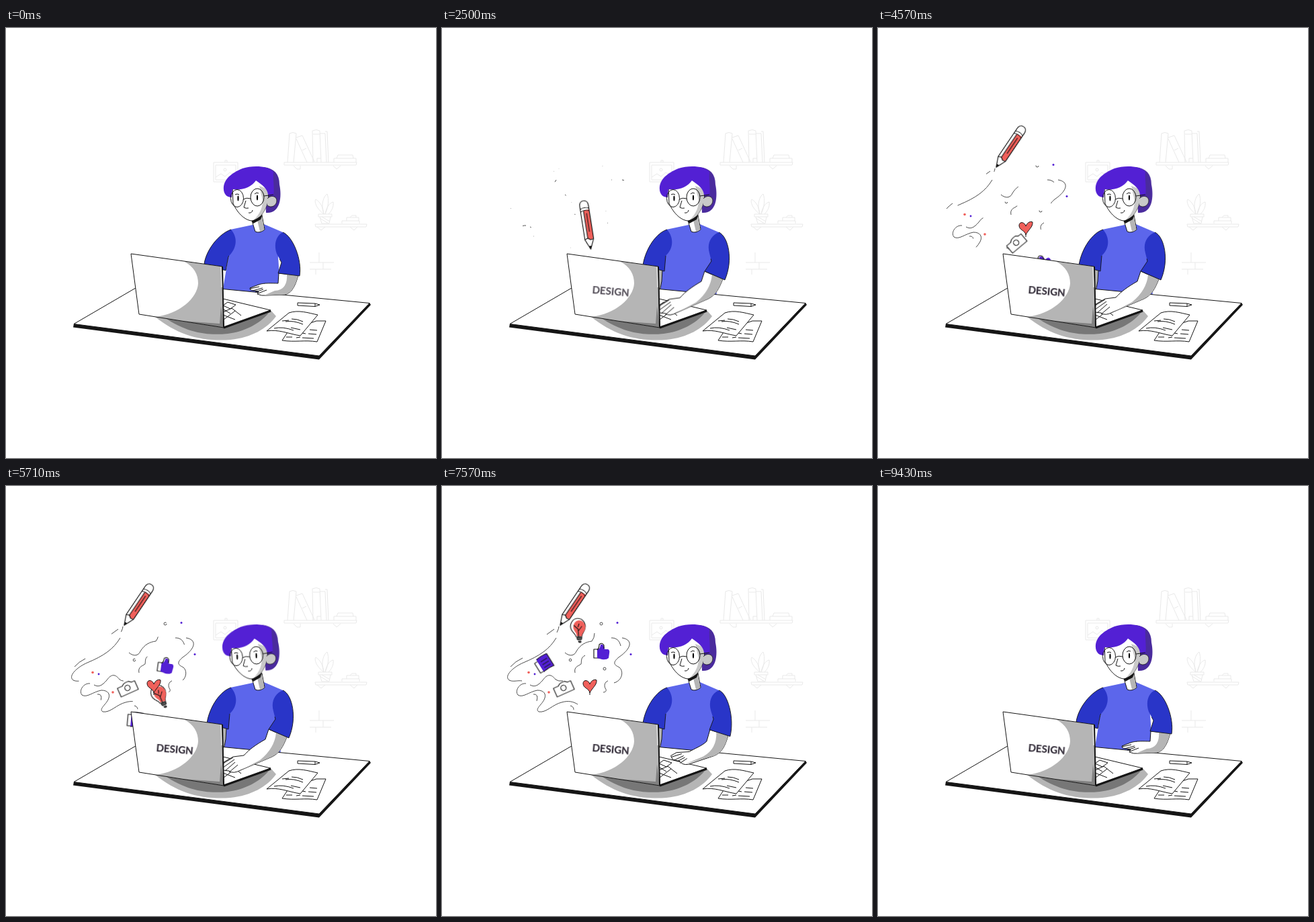
Write an HTML page that moves like this. It is 640 by 640 pixels and loops after 9.5 s.

```html
<!DOCTYPE html>
<html lang="en">
<head>
<meta charset="utf-8">
<title>Designer at a desk</title>
<style>
html, body { margin: 0; width: 100%; height: 100%; overflow: hidden; background: #fff; }
svg { display: block; width: 100vw; height: 100vh; }
svg * { animation: 9.5s linear infinite; }

.line { fill: none; stroke: #151515; stroke-width: 1; stroke-linejoin: round; }
.ink { fill: #fff; stroke: #151515; stroke-width: 1; stroke-linejoin: round; }
.faint { fill: none; stroke: #e9e9e9; stroke-width: 1; }
.grey { fill: #b5b5b5; }
.red { fill: #f0605b; }
.violet { fill: #5320d4; }
.label { font: 700 15px Lato, "Open Sans", sans-serif; text-anchor: middle; fill: #39333f; stroke: #39333f; stroke-width: .25; animation-name: label; }

@keyframes label { 0%, 3.5% { opacity: 0 } 11.3% { opacity: .34 } 26.3% { opacity: .82 } 34%, 100% { opacity: 1 } }

/* head and arms */
.head { transform-origin: 374px 295px; animation-name: sway; }
@keyframes sway {
  0%, 25%, 50%, 76%, 100% { transform: none; animation-timing-function: ease-in-out }
  12%, 37%, 62% { transform: rotate(-2deg); animation-timing-function: ease-in-out }
}
/* the dash leaves the seam between sleeve and shirt unstroked */
.sleeve { fill: #2935c8; stroke: #151515; stroke-width: .9; stroke-dasharray: 74 26; }
.leftSleeve { animation-name: leftSleeve; }
@keyframes leftSleeve {
  0%, 88%, 100% { d: path("M335 300C317 306 298 330 295 351L327 361L331 340C343 329 346 313 335 300Z") }
  12%, 23%, 72.6%, 80.8% { d: path("M335 300C319 305 303 328 299 353L331 362L333 339C344 329 346 313 335 300Z") }
}
.leftForearm { animation-name: leftForearm; }
@keyframes leftForearm { 0%, 88%, 100% { transform: translateX(-7px) } 11%, 80.8% { transform: none } }

.rightSleeve { animation-name: rightSleeve; }
@keyframes rightSleeve {
  0%, 88%, 100% { d: path("M412 304C427 310 441 345 437 369L405 365L410 349L403 336C398 322 402 309 412 304Z"); animation-timing-function: ease-in }
  11.3%, 80.8% { d: path("M412 304C425 308 436 345 431 372L400 363L405 347L401 335C397 321 401 309 412 304Z"); animation-timing-function: ease-out }
  23%, 72.6% { d: path("M412 304C426 310 434 345 421 375L391 362L401 347L398 335C394 321 400 309 412 304Z"); animation-timing-function: ease-in }
}
.forearm { animation-name: forearm; }
@keyframes forearm {
  0%, 88%, 100% { d: path("M406 365L405 380C396 380 384 379 376 382L363 387L364 390L376 392L374 396Q380 399 388 398L413 397C426 396 431 382 435 368Z"); animation-timing-function: ease-in }
  11.3%, 80.8% { d: path("M401 363L396 381C390 388 380 390 372 394L352 395L345 399L349 403L360 406Q363 412 371 412L408 401C420 396 424 386 428 371Z"); animation-timing-function: ease-out }
  23%, 72.6% { d: path("M391 362L386 377C372 385 362 392 354 401L338 403L324 411L323 423L332 424Q338 429 349 423L396 403C408 397 412 388 418 374Z"); animation-timing-function: ease-in }
}
.armShade { animation-name: armShade; }
@keyframes armShade {
  0%, 88%, 100% { d: path("M384 398L413 397C426 396 431 382 435 368L418 365Q420 390 400 391Z"); animation-timing-function: ease-in }
  11.3%, 80.8% { d: path("M366 411L408 401C420 396 424 386 428 371L410 366Q412 391 392 401Z"); animation-timing-function: ease-out }
  23%, 72.6% { d: path("M349 423L396 403C408 397 412 388 418 374L402 367Q400 390 378 408Z"); animation-timing-function: ease-in }
}
.fingers { animation-name: fingers; }
@keyframes fingers {
  0%, 88%, 100% { d: path("M363 388L377 385M367 391L382 387M371 393L383 389M375 395L388 390"); animation-timing-function: ease-in }
  11.3%, 80.8% { d: path("M346 401L362 397M352 405L365 400M357 406L367 402M360 409L370 403"); animation-timing-function: ease-out }
  23%, 72.6% { d: path("M323 413L338 404M323 419L340 407M326 424L341 411M332 426L345 415"); animation-timing-function: ease-in }
}
.typing { transform-origin: 408px 380px; animation-name: typing; }
@keyframes typing {
  0%, 24%, 28%, 32%, 36%, 40%, 44%, 48%, 52%, 56%, 60%, 64%, 68%, 72%, 100% { transform: none }
  26%, 30%, 34%, 38%, 42%, 46%, 50%, 54%, 58%, 62%, 66%, 70% { transform: rotate(-.7deg) }
}

/* ideas rising from the screen */
.ideas { animation-name: ideas; }
.ideas .ink, .ideas .line { stroke-width: 1.15; }
@keyframes ideas { 0%, 82.5% { opacity: 1 } 97%, 99.2% { opacity: .12 } 99.22%, 100% { opacity: 0 } }
.trails { fill: none; stroke: #3a3a3a; stroke-width: .9; }
.trails * { stroke-dasharray: 100 104; animation-name: draw; }
@keyframes draw { 0%, 25% { stroke-dashoffset: 102 } 26.3% { stroke-dashoffset: 97 } 48% { stroke-dashoffset: 46 } 60% { stroke-dashoffset: 9 } 66%, 100% { stroke-dashoffset: 0 } }
.dots { animation-name: dots; }
@keyframes dots { 0%, 28% { opacity: 0 } 36%, 100% { opacity: 1 } }

.pencil { animation-name: pencil; }
@keyframes pencil {
  0%, 17.9% { transform: translate(222px, 385px) rotate(-9deg) }
  26.3% { transform: translate(216px, 294px) rotate(-9deg) }
  31.6% { transform: translate(208px, 235px) rotate(8deg); animation-timing-function: ease-out }
  38.5%, 100% { transform: translate(196px, 177.5px) rotate(34deg) }
}
.heart { animation-name: heart; }
@keyframes heart {
  0%, 36% { transform: translate(225px, 376px) rotate(-20deg); animation-timing-function: ease-out }
  47.5%, 100% { transform: translate(220px, 298px) }
}
.camera { animation-name: camera; }
@keyframes camera {
  0%, 41% { transform: translate(230px, 375px) rotate(-60deg) }
  48.1% { transform: translate(206px, 320px) rotate(-40deg); animation-timing-function: ease-out }
  59.5%, 100% { transform: translate(181px, 301px) rotate(-24deg) }
}
.thumb { animation-name: thumb; }
@keyframes thumb {
  0%, 44% { transform: translate(255px, 376px) rotate(-40deg) }
  48.1% { transform: translate(247px, 350px) rotate(-30deg) }
  60.1% { transform: translate(238px, 268px) rotate(8deg); animation-timing-function: ease-out }
  68%, 100% { transform: translate(238px, 247px) }
}
.bulb { animation-name: bulb; }
@keyframes bulb {
  0%, 53% { transform: translate(242px, 382px) rotate(-45deg) }
  60.1% { transform: translate(228px, 311px) rotate(-24deg); animation-timing-function: ease-out }
  73.5%, 100% { transform: translate(202.5px, 212px) rotate(-4deg) }
}
.book { animation-name: book; }
@keyframes book {
  0%, 55% { transform: translate(218px, 378px) rotate(10deg) }
  60.1% { transform: translate(194px, 349px) rotate(5deg); animation-timing-function: ease-out }
  74%, 100% { transform: translate(153px, 264px) rotate(-32deg) }
}
</style>
</head>
<body>
<svg viewBox="0 0 640 640">
  <!-- wall -->
  <g class="faint">
    <path d="M414 200H522L521 204H414ZM428 205L433 210H438V205M487 205L492 210L498 205"/>
    <path d="M419 200L422 157Q427 154 432 157L428 200M432 163L441 160L459 199M432 165L448 200M441 182L447 179M457 200L456 153Q462 150 467 153L469 200M457 158H467M467 157H475L477 200M475 154H478L480 200M463 200V194H469"/>
    <path d="M488 200V194H521V200M492 194L494 189H516L517 194"/>
    <path d="M460 292H537L536 296H461ZM463 296L469 301L475 296M512 296L518 301L523 296M500 291V287H526V291M507 287V282H525V287M512 282L515 279H521V282"/>
    <path d="M465 277H485V281H465ZM467 281L470 291H481L483 281M467 283L480 291M470 281L482 288M473 277C460 267 459 257 461 255C468 259 472 267 473 277C468 262 473 250 478 247C481 255 480 266 475 277C477 266 482 260 487 259C488 267 484 273 480 277"/>
    <path d="M452 349H488M452 359H484M466 334V349M472 349V359M461 359V367"/>
    <path d="M309 200H345V229H309ZM312 204H342V226H312ZM312 222L320 217L326 221L333 215L342 220M326 200V197H329V200"/>
    <circle cx="326" cy="211" r="2"/>
  </g>

  <!-- person -->
  <path fill="#5c66eb" d="M334 300L367 293L384 292L412 304L405 340L409 400L322 394L331 340Z"/>
  <path class="grey leftForearm" stroke="#151515" d="M318 356L328 360Q328 378 324 392L317 392Z"/>
  <path class="sleeve leftSleeve" pathLength="100" d="M335 300C317 306 298 330 295 351L327 361L331 340C343 329 346 313 335 300Z"/>
  <path class="ink" d="M366 287L371 303Q378 306 385 300L381 279Z"/>
  <path class="grey" d="M374 286L381 280L384.500 300L378 303Z"/>
  <g class="head">
    <path fill="#4a2b9d" d="M384 207C399 209 407 217 407 233C411 252 408 277 387 275L385 235Z"/>
    <path class="ink" d="M337 236L338 261C345 277 357 287 367 287C378 284 387 272 390 256L391 230L370 222Z"/>
    <path fill="#c9c9c9" d="M377 235L390 240L390 256C387 272 378 284 368 286.500C378 277 384 265 381 252Z"/>
    <path fill="#151515" d="M366 287Q376 283 382 277L379 285L368 291Z"/>
    <path class="violet" d="M336 252C327 252 323 245 324 236C326 222 340 214 352 209C368 204 390 205 398 214C397 226 400 239 398 251L390 248C389 239 382 234 372 227C365 237 352 242 337 240Z"/>
    <path fill="#c9c9c9" stroke="#151515" stroke-width=".8" d="M389 254C394 248 403 250 403 257C403 264 395 269 389 264"/>
    <g class="line">
      <ellipse cx="344" cy="253.500" rx="9.500" ry="13"/>
      <ellipse cx="374" cy="252" rx="10" ry="13"/>
      <path d="M353 255Q358 252 364 254M384 250L398 248M357 257L354 267Q357 269 361 268M361 275Q366 276 367 271M341 248Q344 246 347 248M370 247Q373 244 376 246"/>
    </g>
    <ellipse cx="345.500" cy="253.500" rx="1.100" ry="4"/>
    <ellipse cx="374" cy="252.500" rx="1.100" ry="4"/>
  </g>

  <!-- desk -->
  <path fill="#151515" d="M101 440L466 487L541 409L543 412L466 493.500L100 445.500Z"/>
  <path class="ink" d="M192 387.500L101 440.500L466 488L541 409.500L323 388.500Z"/>
  <path stroke="#fff" stroke-width="3" d="M193 388L322 389"/>
  <path class="grey" d="M222 430C256 457 290 467 334 464C365 461 389 447 402 429L394 420Z"/>
  <path fill="#777" d="M236 431C270 454 300 458 330 455C355 452 378 440 391 424L324 444Z"/>
  <path class="ink" d="M323 403L394 420L324 446Z"/>
  <path class="line" d="M323 413L330 408L342 412L334 418ZM323 423L336 417L350 428M324 434L341 421M323 427L341 434M324 419L334 425"/>
  <path stroke="#151515" stroke-width="3" d="M394 421L324 446"/>
  <path class="ink" d="M462 436L476 436L463 467C445 464 430 468 411 465L421 450Z"/>
  <path class="line" d="M452 449L463 450M450 455L462 456M441 454L446 455M432 461L438 460M441 461L458 462M417 460L426 460"/>
  <path class="ink" d="M421 424C435 419 450 424 464 427L438 458C420 455 405 448 388 451Z"/>
  <path class="line" d="M425 433Q434 433 442 437M416 437Q428 435 442 441M411 436L421 435M399 447Q412 444 428 450M424 446L438 449"/>
  <path class="ink" d="M434 409L460 410L467 412L460 414.500L434 413ZM460 410V414.500"/>

  <!-- working arm -->
  <g class="typing">
    <path class="ink forearm" d="M406 365L405 380C396 380 384 379 376 382L363 387L364 390L376 392L374 396Q380 399 388 398L413 397C426 396 431 382 435 368Z"/>
    <path class="grey armShade" d="M384 398L413 397C426 396 431 382 435 368L418 365Q420 390 400 391Z"/>
    <path class="line fingers" d="M363 388L377 385M367 391L382 387M371 393L383 389M375 395L388 390"/>
  </g>
  <path class="sleeve rightSleeve" pathLength="100" d="M412 304C427 310 441 345 437 369L405 365L410 349L403 336C398 322 402 309 412 304Z"/>

  <!-- ideas -->
  <g class="ideas">
    <g class="trails">
      <path pathLength="100" d="M170 226C160 243 145 253 121 263C105 270 92 283 100 289C106 292 112 289 119 290"/>
      <path pathLength="100" d="M102 269Q109 261 120 256"/>
      <path pathLength="100" d="M125 294C115 293 108 305 113 311C120 316 130 306 142 304C152 304 156 310 152 318C148 326 138 332 144 336C155 338 165 325 178 322C188 319 196 321 202 325"/>
      <path pathLength="100" d="M136 310Q144 309 141 320"/>
      <path pathLength="100" d="M131 296C138 300 143 297 150 289C157 279 163 280 169 288Q173 291 180 290"/>
      <path pathLength="100" d="M183 248C190 254 197 253 200 246C206 236 214 232 223 231Q227 226 227 219"/>
      <path pathLength="100" d="M198 278C196 269 203 268 207 265C208 260 206 256 213 252"/>
      <path pathLength="100" d="M268 226C285 229 282 242 263 255C252 264 258 267 264 270C271 276 268 290 256 293"/>
      <path pathLength="100" d="M252 226C260 226 264 230 266 238"/>
      <path pathLength="100" d="M247 290C242 292 241 297 243 301C246 305 243 307 240 307"/>
      <path pathLength="100" d="M167 213L156 221"/>
      <path pathLength="100" d="M174 209Q174 212 171 218"/>
      <path pathLength="100" d="M191 327Q196 328 196 333"/>
      <circle pathLength="100" cx="237" cy="205" r="2"/>
      <circle pathLength="100" cx="191" cy="259" r="1.800"/>
      <circle pathLength="100" cx="242" cy="272" r="2"/>
    </g>
    <g class="dots">
      <g class="red"><circle cx="129" cy="277.500" r="1.800"/><circle cx="159" cy="307" r="1.800"/></g>
      <g class="violet"><circle cx="138" cy="280" r="1.400"/><circle cx="261" cy="203.500" r="1.500"/><circle cx="281" cy="250.500" r="1.500"/></g>
    </g>
    <g class="book">
      <path class="ink" d="M-13 -8H0V9H-13Z"/>
      <path class="violet" d="M-8 -11Q0 -13 10 -11V10Q0 8 -8 10Z"/>
      <path class="line" d="M-8 -11Q0 -13 10 -11V10Q0 8 -8 10M-4 -5H7M-4 0H7M-4 5H7"/>
    </g>
    <g class="bulb">
      <path class="ink" d="M-4 12C-4 7 -11 5 -11 -3A11 12 0 0 1 11 -3C11 5 5 7 5 12Z"/>
      <path class="red" d="M-3 11C-2 6 -7 4 -7 -2A9 10 0 0 1 11 -2C11 5 5 7 5 12Z"/>
      <path class="line" d="M0 13V1L-6 -5M0 4L6 -3M0 -2L2 -7"/>
      <path fill="#555" stroke="#151515" d="M-3 13H5L4 17H-2ZM-1 19H3V21H0Z"/>
    </g>
    <g class="camera">
      <path class="ink" d="M-14 -6L-6 -6Q-3 -9 0 -9H5L9 -6H14V8H-14Z"/>
      <circle class="line" cx="0" cy="-.5" r="4"/>
    </g>
    <g class="thumb">
      <path class="ink" d="M-12 -4H-4V9H-12Z"/>
      <path class="violet" d="M-7 -3Q-2 -6 -2 -11Q3 -13 4 -4H9Q12 -3 11 2L10 9Q7 12 0 11L-7 9Z"/>
      <path class="line" d="M-7 -3Q-4 -6 -4 -11Q0 -15 3 -10V-5"/>
    </g>
    <g class="heart">
      <path class="red" stroke="#151515" d="M0 10C-1 3 -10 3 -10 -4C-10 -10 -2 -10 0 -3C2 -9 8 -11 10 -9C11 -2 3 3 0 10V13"/>
    </g>
    <g class="pencil">
      <path class="ink" d="M-6.500 21V-30Q-6 -37 0 -37Q6 -37 6.500 -30V21L0 36Z"/>
      <path class="red" d="M-2 -23H6V20L3 22L-2 20Z"/>
      <path class="line" d="M-6.500 -25Q0 -28 6.500 -25M-6.500 -21Q0 -24 6.500 -21M-2 -22V20M2 -18V10M-6.500 21L-2 19L2 22L6.500 21V-30"/>
      <path fill="#151515" d="M-2.200 31H2.200L0 36Z"/>
    </g>
  </g>

  <!-- laptop lid -->
  <path fill="#fff" d="M186 336L322 355L324 446L198 426Z"/>
  <path class="grey" d="M265 347.500C280 355 286 367 286 380C285 402 258 426 222 430L324 446L321 355Z"/>
  <path fill="#808080" d="M320 414L324 446L262 436L318 440Z"/>
  <path class="line" d="M186 336L322 355L324 446L198 426Z"/>
  <path stroke="#151515" stroke-width="2" d="M322 355L324 446"/>
  <path stroke="#fff" stroke-width="1" d="M320 356L321 386"/>
  <text class="label" transform="translate(250.700 397.200) rotate(5)">DESIGN</text>
</svg>
</body>
</html>
```
